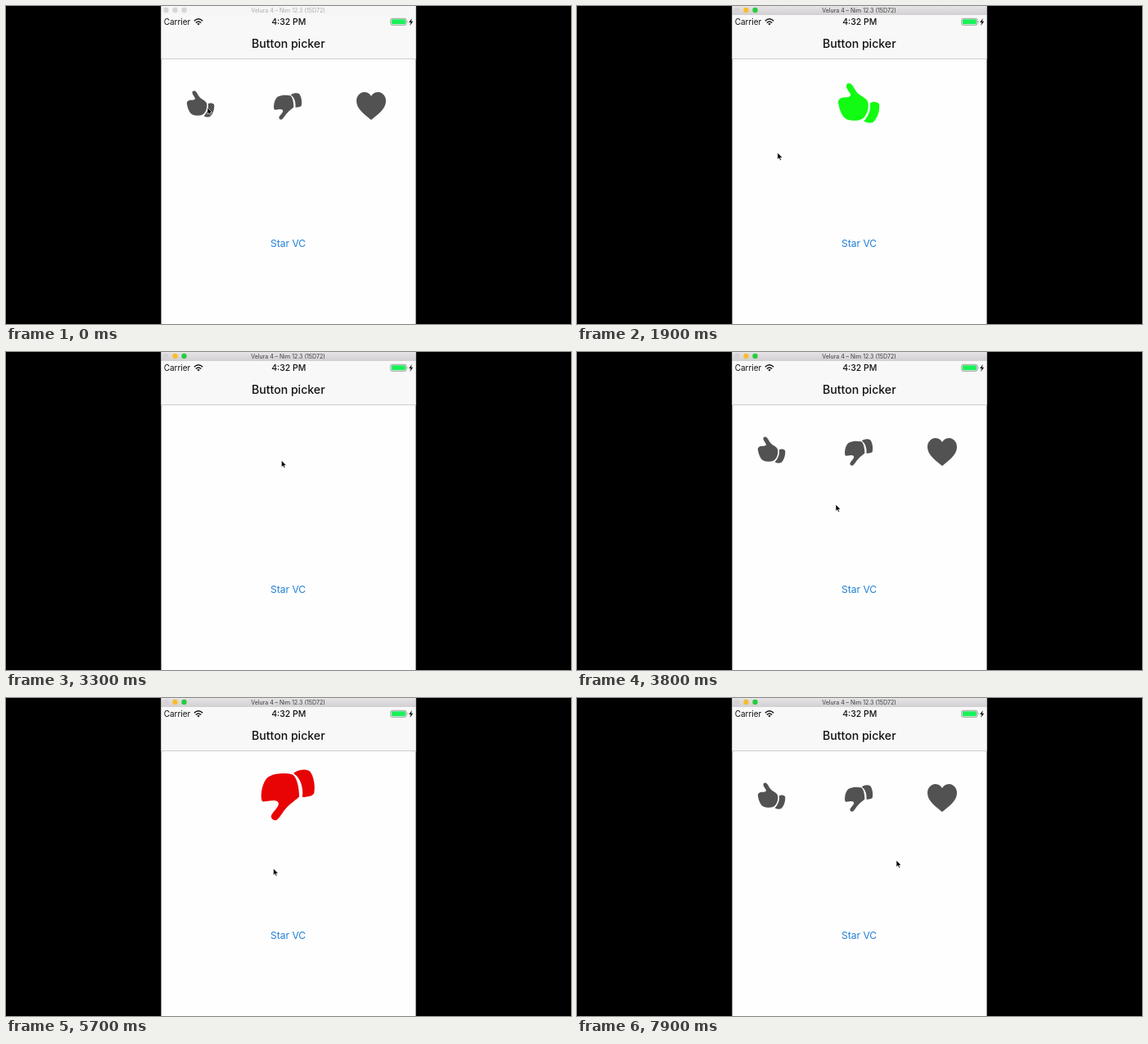
An HTML page that plays this animation: 690 px wide and 388 px high, repeating every 8000 ms.

```html
<!DOCTYPE html>
<html lang="en">
<head>
<meta charset="utf-8">
<title>Button picker</title>
<style>
  html, body { margin: 0; width: 100%; height: 100%; overflow: hidden; background: #000; }
  svg { display: block; width: 690px; height: 388px; }
  text { font-family: Inter, Roboto, "Liberation Sans", sans-serif; text-anchor: middle; fill: #111; }
</style>
</head>
<body>
<svg viewBox="0 0 690 388">
  <defs>
    <linearGradient id="barFill" x2="0" y2="1">
      <stop stop-color="#e6e4e6"/><stop offset="1" stop-color="#d1cfd1"/>
    </linearGradient>
    <g id="up">
      <g transform="scale(.667)">
        <path d="M-15-21C-15-25-10-25-8-22C-4-17-4-14 0-11C4-8 9-6 11-2C13 4 11 13 6 18C2 22-8 22-14 20C-21 17-24 6-25-1C-25-5-21-7-17-7C-13-7-9-8-10-11C-12-15-15-17-15-21Z"/>
        <path d="M16-1C20-2 23-1 25 1C26 9 23 18 18 23C15 25 10 24 6 22C12 16 15 8 14 1Q14-1 16-1Z"/>
      </g>
    </g>
    <g id="down">
      <g transform="scale(.526)">
        <path d="M-32 4C-33-6-29-20-22-23C-14-27-2-27 6-25C11-22 14-10 14 2C10 6 3 10-1 15C-6 20-9 27-13 30C-17 32-21 28-20 25C-18 20-11 15-11 10C-12 6-17 6-22 7L-30 8Q-32 7-32 4Z"/>
        <path d="M9-28C14-31 22-32 27-29C31-24 34-13 32-2Q30 1 26 1.5L20 2.5Q17 3 18 0C19-10 15-21 9-25Q6-27 9-28Z"/>
      </g>
    </g>
  </defs>

  <rect width="690" height="388"/>
  <g id="phone">
    <rect x="189.5" width="311" height="388" fill="#fefefe"/>
    <rect x="189.5" y="11" width="311" height="53.5" fill="#f8f8f8"/>
    <rect x="189.5" y="64" width="311" height="1" fill="#cdcdcd"/>
    <rect id="bar" x="189.5" width="311" height="11"/>
  </g>
  <g id="lights">
    <circle cx="195.5" cy="5" r="3.2"/><circle cx="206.5" cy="5" r="3.2"/><circle cx="217.5" cy="5" r="3.2"/>
  </g>
  <text id="caption" x="344.5" y="7.6" font-size="7">Velura 4 – Nim 12.3 (15D72)</text>

  <text x="209" y="23" font-size="10">Carrier</text>
  <g fill="none" stroke="#111" stroke-width="1.4">
    <path d="M229.8 18.3Q235 13.3 240.2 18.3M231.8 20.4Q235 17.4 238.2 20.4"/>
    <path d="M235 23.6L233.2 21.6Q235 20.2 236.8 21.6Z" fill="#111" stroke="none"/>
  </g>
  <text x="345.3" y="23" font-size="10.5" font-weight="500">4:32 PM</text>
  <rect x="469.8" y="15.3" width="19" height="8" rx="1.6" fill="#fff" stroke="#777" stroke-width=".7"/>
  <rect x="470.8" y="16.3" width="17" height="6" rx=".8" fill="#1bf05a"/>
  <path d="M489.8 17.8Q491.2 19.3 489.8 20.8Z" fill="#777"/>
  <path d="M495.8 15L492 20H494.3L493.2 24L497.2 18.7H494.8Z" fill="#111"/>
  <text x="344.8" y="51.2" font-size="14.1" font-weight="500">Button picker</text>
  <text x="344.6" y="294.3" font-size="12" style="fill:#207fd6">Star VC</text>

  <g id="choices" fill="#525252">
    <use href="#up" x="237.5" y="119.5"/>
    <use href="#down" x="344" y="122.5"/>
    <path transform="translate(446 122)" d="M0 17C-7 11-18 4-18-6C-18-13-13-17-8.5-17C-4-17-1-14 0-12C1-14 4-17 8.5-17C13-17 18-13 18-6C18 4 7 11 0 17Z"/>
  </g>
  <g id="spinner" stroke="#555" stroke-width="1.3" stroke-linecap="round"></g>
  <use id="green" href="#up" fill="#12fb12"/>
  <use id="red" href="#down" fill="#e80404"/>
  <path id="cursor" d="M0 0V8.2L1.9 6.5L3.2 9.3L4.6 8.7L3.4 6H6Z" fill="#000" stroke="#fff" stroke-width=".6"/>
</svg>
<script>
const LOOP = 8000, STEP = 100, ACTIVATE = 700;
const el = id => document.getElementById(id);
const show = (node, alpha) => node.setAttribute("opacity", alpha);
const clamp = v => Math.min(1, Math.max(0, v));
const smooth = v => v * v * (3 - 2 * v);

// A tap hides the choices; the picked one springs in after a wait, then grows away.
const picks = [
  { node: el("green"), tap: 600, enter: 1800, leave: 2900 },
  { node: el("red"), tap: 4400, enter: 5500, leave: 7000 }
];

const home = { x: 246, y: 124 };
const moves = [
  { from: 750, to: 1350, x: 236, y: 184 },
  { from: 1700, to: 2800, x: 338, y: 128 },
  { from: 3200, to: 3800, x: 316, y: 186 },
  { from: 4100, to: 4500, x: 340, y: 122 },
  { from: 4900, to: 5600, x: 326.5, y: 208 },
  { from: 6100, to: 6600, x: 345, y: 103 },
  { from: 7100, to: 7700, x: 390, y: 198 }
];

const spokes = Array.from({ length: 12 }, (_, i) => {
  const line = document.createElementNS("http://www.w3.org/2000/svg", "line");
  line.setAttribute("y1", -4.2);
  line.setAttribute("y2", -7.6);
  line.setAttribute("transform", `translate(344.5 114.5) rotate(${i * 30})`);
  return el("spinner").appendChild(line);
});

function drawWindow(active) {
  el("bar").setAttribute("fill", active ? "url(#barFill)" : "#f6f6f6");
  el("caption").style.fill = active ? "#3c3c3c" : "#aaa";
  const colors = active ? ["#d6d3d6", "#f8bd2d", "#28cb41"] : Array(3).fill("#d5d5d5");
  [...el("lights").children].forEach((c, i) => c.setAttribute("fill", colors[i]));
}

function drawChoices(t) {
  const hidden = picks.map(p => clamp(Math.min((t - p.tap) / 300, (p.leave + 800 - t) / 200)));
  show(el("choices"), 1 - Math.max(...hidden));
}

function drawSpinner(t) {
  const wait = picks.find(p => t >= p.tap + 200 && t < p.enter);
  show(el("spinner"), wait ? 1 : 0);
  if (!wait) return;
  const head = 4 + Math.floor((t - wait.tap - 200) * 12 / 1000);
  spokes.forEach((s, i) => show(s, Math.max(.2, .85 - ((head - i + 24) % 12) * .08)));
}

function drawPick({ node, enter, leave }, t) {
  const age = Math.max(0, t - enter) / 1000;
  const exit = clamp((t - leave) / 400);
  const spring = 1 - Math.exp(-6.5 * age) * Math.cos(age * Math.PI / .2);
  const scale = 1.5 * spring + 1.9 * exit ** 2;
  show(node, 1 - exit ** 3);
  node.setAttribute("transform", `translate(344 118.5) scale(${scale})`);
}

function drawCursor(t) {
  let { x, y } = home;
  for (const m of moves) {
    const k = smooth(clamp((t - m.from) / (m.to - m.from)));
    x += (m.x - x) * k;
    y += (m.y - y) * k;
  }
  el("cursor").setAttribute("transform", `translate(${x} ${y})`);
}

function draw(t) {
  drawWindow(t >= ACTIVATE);
  drawChoices(t);
  drawSpinner(t);
  picks.forEach(p => drawPick(p, t));
  drawCursor(t);
}

const start = performance.now();
function tick() {
  const t = (performance.now() - start) % LOOP;
  draw(Math.floor(t / STEP) * STEP);
  requestAnimationFrame(tick);
}
tick();
</script>
</body>
</html>
```
